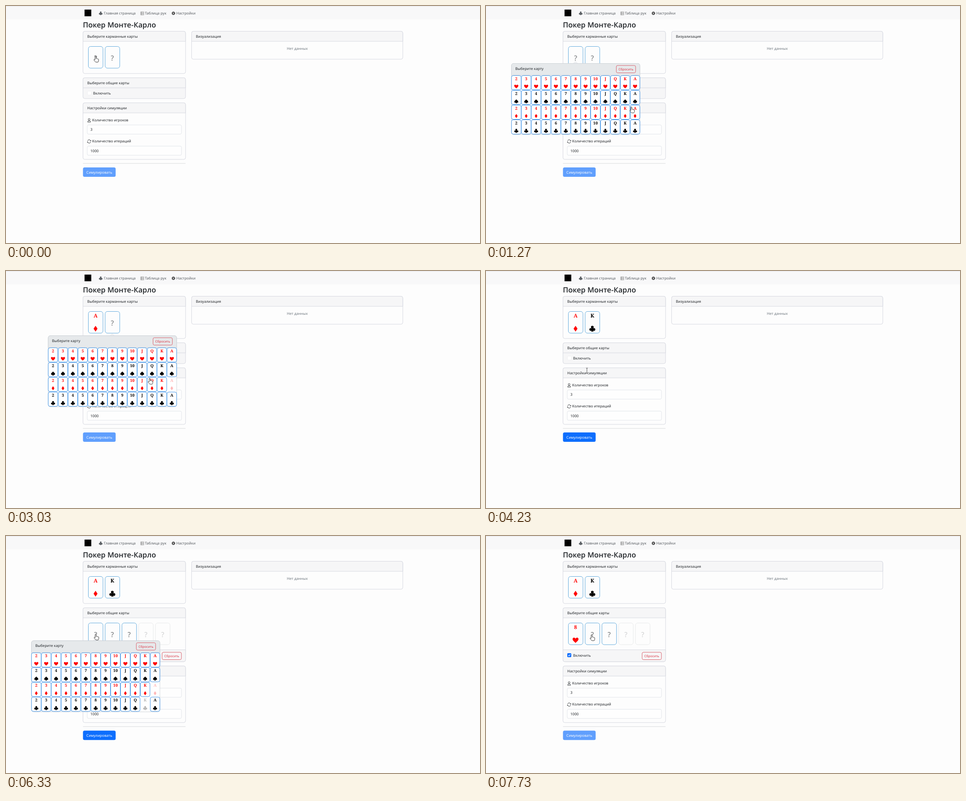
An HTML page for the animation above (8000 ms loop, 1056 by 530 pixels).

```html
<!DOCTYPE html>
<html lang="ru">
<head>
<meta charset="utf-8">
<title>Покер Монте-Карло</title>
<style>
html, body { margin: 0; width: 100%; height: 100%; overflow: hidden; background: #fdfdfd; }
svg { display: block; }
text { font: 8.05px "Noto Sans", "Open Sans", sans-serif; fill: #212529; text-rendering: geometricPrecision; }
.title { font: 600 16.3px "Open Sans", "Noto Sans", sans-serif; }
.nav { fill: #555a5f; }
.mute { fill: #6c757d; }
.mid { text-anchor: middle; }
.light { fill: #fff; }
.reset { font-size: 7.15px; fill: #dc3545; text-anchor: middle; }
.rank { font: 900 9px "Noto Serif", "Liberation Serif", serif; text-anchor: middle; fill: inherit; }
.big .rank { font-size: 11.5px; }
.ask { font-size: 15.5px; fill: #6a6d70; text-anchor: middle; }
.panel { fill: #fdfdfd; stroke: #d6d8e0; }
.bar { fill: #f6f6f7; stroke: #d6d8e0; }
.input { fill: #fefefe; stroke: #e2e5ea; }
.face { fill: #fff; stroke: #3d92e6; }
.big .face { fill: #fdfdfd; stroke: #62aadd; }
.off { opacity: .28; }
.off .face { stroke: none; }
.dim { opacity: .3; }
.dim .face { stroke: #b8bcc0; }
.line { fill: none; stroke: #2b2f33; stroke-width: .9; }
.cursor path { fill: #fff; stroke: #222; stroke-width: .9; stroke-linejoin: round; }
</style>
</head>
<body>
<svg id="stage" width="1056" height="530" viewBox="0 0 1056 530"></svg>
<script>
const LOOP = 8000;
const RED = '#f00', BLACK = '#000';
const RANKS = ['2', '3', '4', '5', '6', '7', '8', '9', '10', 'J', 'Q', 'K', 'A'];
const STEM = 'M-.5 1H.5Q.6 3.8 2.2 5H-2.2Q-.6 3.8-.5 1Z';
const SUITS = [
  [RED, 'M0 4.8C-1 3.2-5 1-5-1.8C-5-4.8-1.2-5.4 0-2.4C1.2-5.4 5-4.8 5-1.8C5 1 1 3.2 0 4.8Z'],
  [BLACK, 'M0-5C1-3 4.8-1 4.8 1.4C4.8 3.8 1.4 4.2 0 2C-1.4 4.2-4.8 3.8-4.8 1.4C-4.8-1 -1-3 0-5Z' + STEM],
  [RED, 'M0-5L3.3 0L0 5L-3.3 0Z'],
  [BLACK, 'M-2.3-2.6a2.3 2.3 0 1 1 4.6 0a2.3 2.3 0 1 1-4.6 0ZM-5 1.4a2.3 2.3 0 1 1 4.6 0a2.3 2.3 0 1 1-4.6 0Z' +
    'M.4 1.4a2.3 2.3 0 1 1 4.6 0a2.3 2.3 0 1 1-4.6 0ZM-1-2H1V2H-1Z' + STEM]
];
const HEART = 0, DIAMOND = 2, CLUB = 3;

const text = (x, y, s, cls = '') => `<text x="${x}" y="${y}" class="${cls}">${s}</text>`;
const rect = (x, y, w, h, r, attrs) => `<rect x="${x}" y="${y}" width="${w}" height="${h}" rx="${r}" ${attrs}/>`;
const path = (d, attrs) => `<path d="${d}" ${attrs}/>`;
const group = (attrs, ...parts) => `<g ${attrs}>${parts.join('')}</g>`;
const at = (x, y) => `transform="translate(${x} ${y})"`;
const topRound = (x, y, w, h) =>
  path(`M${x} ${y + h}v${4 - h}q0-4 4-4h${w - 8}q4 0 4 4v${h - 4}Z`, 'class="bar"');
const panel = (x, y, w, h, head, title) =>
  rect(x, y, w, h, 4, 'class="panel"') + topRound(x, y, w, head) + text(x + 9.5, y + 14.5, title);
const resetButton = (x, y) =>
  rect(x, y, 43, 16.5, 3, 'fill="none" stroke="#d9606c"') + text(x + 21.5, y + 11.2, 'Сбросить', 'reset');

function smallCard(suit, i) {
  const [color, shape] = SUITS[suit];
  return group(`id="c${suit}-${i}" fill="${color}" ${at(i * 22.05, 27 + suit * 33)}`,
    rect(.5, .5, 21.4, 32, 4, 'class="face"'),
    text(11.2, 10.6, RANKS[i], 'rank'),
    path(shape, 'transform="translate(11.2 25) scale(.92)"'));
}

const bigFace = rect(.5, .5, 32.5, 48.5, 5, 'class="face"');
const slot = (x, y, id, dim = '') =>
  group(`id="${id}" class="big ${dim}" ${at(x, y)}`, bigFace, text(16.5, 32.4, '?', 'ask'));
function bigCard(x, y, id, suit, rank) {
  const [color, shape] = SUITS[suit];
  return group(`id="${id}" class="big" fill="${color}" ${at(x, y)}`, bigFace,
    text(16.5, 14, rank, 'rank'), path(shape, 'transform="translate(16.5 39) scale(1.32)"'));
}

const clubIcon = path(SUITS[CLUB][1], 'fill="#555a5f" transform="translate(211 16.2) scale(.82)"');
const tableIcon = path('M300 13H307V20H300ZM300 15.4H307M300 17.7H307M302.4 13V20', 'class="line" style="stroke:#777;stroke-width:.7"');
const gearIcon = '<circle cx="373" cy="16.3" r="3.6" fill="none" stroke="#333" stroke-dasharray="1.6 1.2"/>' +
  '<circle cx="373" cy="16.3" r="2.2" fill="none" stroke="#333" stroke-width="1.6"/>';
const personIcon = '<circle cx="185.2" cy="253.6" r="2" class="line"/>' +
  path('M181.9 259.6Q182 256.4 185.2 256.4T188.5 259.6Z', 'class="line"');
const cycleIcon = path('M181.9 301.6A3.4 3.4 0 0 1 188.3 301M188.6 304A3.4 3.4 0 0 1 182.2 304.8', 'class="line"') +
  path('M187 300.8h3.2l-1.5 2ZM180.3 304.9h3.2l-1.7-2Z', 'fill="#2b2f33"');

const deck = SUITS.flatMap((_, s) => RANKS.map((_, i) => smallCard(s, i))).join('');
const slotX = [183, 220.4, 257.8, 295.1, 332.5];

document.getElementById('stage').innerHTML = [
  rect(0, 0, 1056, 30, 0, 'fill="#f8f8f9"'),
  rect(0, 0, 1056, 1, 0, 'fill="#e6e8ee"'),
  rect(175, 8, 15, 15, 0, 'fill="#000"'),
  clubIcon, text(218, 19, 'Главная страница', 'nav'),
  tableIcon, text(309.5, 19, 'Таблица рук', 'nav'),
  gearIcon, text(379.5, 19, 'Настройки', 'nav'),
  text(171.3, 48.2, 'Покер Монте-Карло', 'title'),
  panel(171.5, 56.5, 228.5, 94.5, 22.5, 'Выберите карманные карты'),
  panel(413.5, 56.5, 470.5, 62.5, 22.5, 'Визуализация'),
  text(649, 98, 'Нет данных', 'mute mid'),
  slot(183, 90, 'ask1'), bigCard(183, 90, 'pocket1', DIAMOND, 'A'),
  slot(220.4, 90, 'ask2'), bigCard(220.4, 90, 'pocket2', CLUB, 'K'),

  group('id="closed"',
    rect(171.5, 160.5, 228.5, 46.5, 4, 'class="bar"'),
    topRound(171.5, 160.5, 228.5, 22.5),
    text(181, 175, 'Выберите общие карты'),
    rect(181.5, 190.5, 8.5, 8.5, 2, 'fill="#fff" stroke="#f0f0f2"'),
    text(194, 198, 'Включить')),
  group('id="open"',
    panel(171.5, 160.5, 228.5, 120.5, 22.5, 'Выберите общие карты'),
    path('M171.5 254.5H400V277q0 4-4 4H175.5q-4 0-4-4Z', 'class="bar"'),
    slotX.map((x, i) => slot(x, 194, 'flop' + i, i > 2 ? 'dim' : '')).join(''),
    bigCard(183, 194, 'flopCard', HEART, '8'),
    rect(178.5, 259.5, 14, 14, 4, 'id="glow" fill="#c2dbfe"'),
    rect(181, 262, 9, 9, 2, 'fill="#0d6efd"'),
    path('M183.2 266.6L184.9 268.3L188 264.8', 'fill="none" stroke="#fff" stroke-width="1.2"'),
    text(194, 269.6, 'Включить'),
    resetButton(347.8, 260)),
  group('id="lower"',
    panel(171.5, 216.5, 228.5, 126.5, 22.5, 'Настройки симуляции'),
    personIcon, text(192, 258, 'Количество игроков'),
    rect(181, 266, 210, 20.5, 3, 'class="input"'), text(188, 279.3, '3'),
    cycleIcon, text(192, 305.3, 'Количество итераций'),
    rect(181, 313.3, 210, 20.5, 3, 'class="input"'), text(188, 326.7, '1000'),
    rect(171.5, 351.5, 228.5, 1, 0, 'fill="#d8d9dc"'),
    group('id="run"', rect(171.5, 361, 72.8, 21, 3.5, 'fill="#0d6efd"'),
      text(207.9, 374.8, 'Симулировать', 'light mid'))),

  group('id="popup"',
    path('M138 .5L143-4.5L148 .5Z', 'fill="#f1f2f4" stroke="#e0e2e6" stroke-width=".7"'),
    rect(.5, .5, 286, 159, 5, 'fill="#fff" stroke="#cdd2d7"'),
    path('M.5 27V5.5q0-5 5-5H281.5q5 0 5 5V27Z', 'fill="#e6e9eb" stroke="#cdd2d7"'),
    text(9, 14.8, 'Выберите карту'), resetButton(234, 5), deck),

  group('id="cursor" class="cursor"',
    path('M-1.3 8V.9a1.2 1.2 0 0 1 2.4 0V5l1-.3q1 0 1.2.8q1-.5 1.8.5q1.5-.3 1.6 1.2V9.5q0 2-1.2 3.5H.3L-3.2 9q-1-1.4 0-1.9t1.9.9Z', 'id="hand"'),
    path('M-2-6Q0-6 0-5Q0-6 2-6M0-5V5M-2 6Q0 6 0 5Q0 6 2 6', 'id="beam" style="fill:none;stroke:#444"'),
    path('M0 0V10.5L2.5 8.3L4.2 12L5.9 11.2L4.3 7.7H7.5Z', 'id="arrow"'))
].join('');

const el = id => document.getElementById(id);
const show = (id, on) => { el(id).style.display = on ? '' : 'none'; };
const clamp = v => Math.max(0, Math.min(1, v));

// Moments of the clicks that change the page
const ACE = 1430, KING = 3430, ENABLE = 5100, BLUR = 5900, EIGHT = 7070;

// opens, closes, left, top
const POPUPS = [
  [25, ACE, 56.3, 128],
  [2318, KING, 93.6, 144.2],
  [6090, EIGHT, 56.3, 233.7]
];

const smooth = p => p * p * (3 - 2 * p);
const linear = p => p;
const easeIn = p => p * p;
const easeOut = p => 1 - (1 - p) ** 2;

// from, to, target x, target y, easing
const MOVES = [
  [180, 1270, 324, 226, smooth],
  [1520, 2130, 242, 128, smooth],
  [2450, 3310, 346, 277, smooth],
  [3500, 3950, 381, 281, smooth],
  [3970, 4230, 225, 223, linear],
  [4230, 4770, 185.5, 193.5, easeOut],
  [5110, 5730, 200, 215, smooth],
  [6220, 6870, 200, 273, smooth],
  [7130, 7730, 235.5, 221, smooth]
];
// until, shape
const SHAPES = [[3580, 'hand'], [4050, 'beam'], [4190, 'arrow'], [4270, 'beam'], [5200, 'arrow'], [LOOP, 'hand']];

function cursorAt(t) {
  let x = 199.5, y = 112.5;
  for (const [a, b, tx, ty, ease] of MOVES) {
    if (t < a) break;
    const p = ease(clamp((t - a) / (b - a)));
    x += (tx - x) * p;
    y += (ty - y) * p;
  }
  return [x, y];
}

function draw(t) {
  show('ask1', t < ACE);
  show('pocket1', t >= ACE);
  show('ask2', t < KING);
  show('pocket2', t >= KING);
  show('closed', t < ENABLE);
  show('open', t >= ENABLE);
  show('glow', t < BLUR);
  show('flop0', t < EIGHT);
  show('flopCard', t >= EIGHT);
  el('lower').setAttribute('transform', `translate(0 ${t >= ENABLE ? 74.2 : 0})`);
  el('run').setAttribute('opacity', t >= KING && t < EIGHT ? 1 : .65);
  el('c2-12').classList.toggle('off', t >= ACE);
  el('c3-11').classList.toggle('off', t >= KING);
  el('c0-6').classList.toggle('off', t >= EIGHT);

  let alpha = 0;
  for (const [a, b, x, y] of POPUPS) {
    const v = clamp((t - a) / 150) - clamp((t - b) / 150);
    if (v > 0) {
      alpha = v;
      el('popup').setAttribute('transform', `translate(${x} ${y})`);
    }
  }
  el('popup').setAttribute('opacity', alpha);
  show('popup', alpha > 0);

  const shape = SHAPES.find(s => t < s[0])[1];
  for (const id of ['hand', 'beam', 'arrow']) show(id, id === shape);
  const [x, y] = cursorAt(t);
  el('cursor').setAttribute('transform', `translate(${x.toFixed(2)} ${y.toFixed(2)})`);
}

const start = performance.now();
function tick() {
  draw((performance.now() - start) % LOOP);
  requestAnimationFrame(tick);
}
draw(0);
requestAnimationFrame(tick);
</script>
</body>
</html>
```
